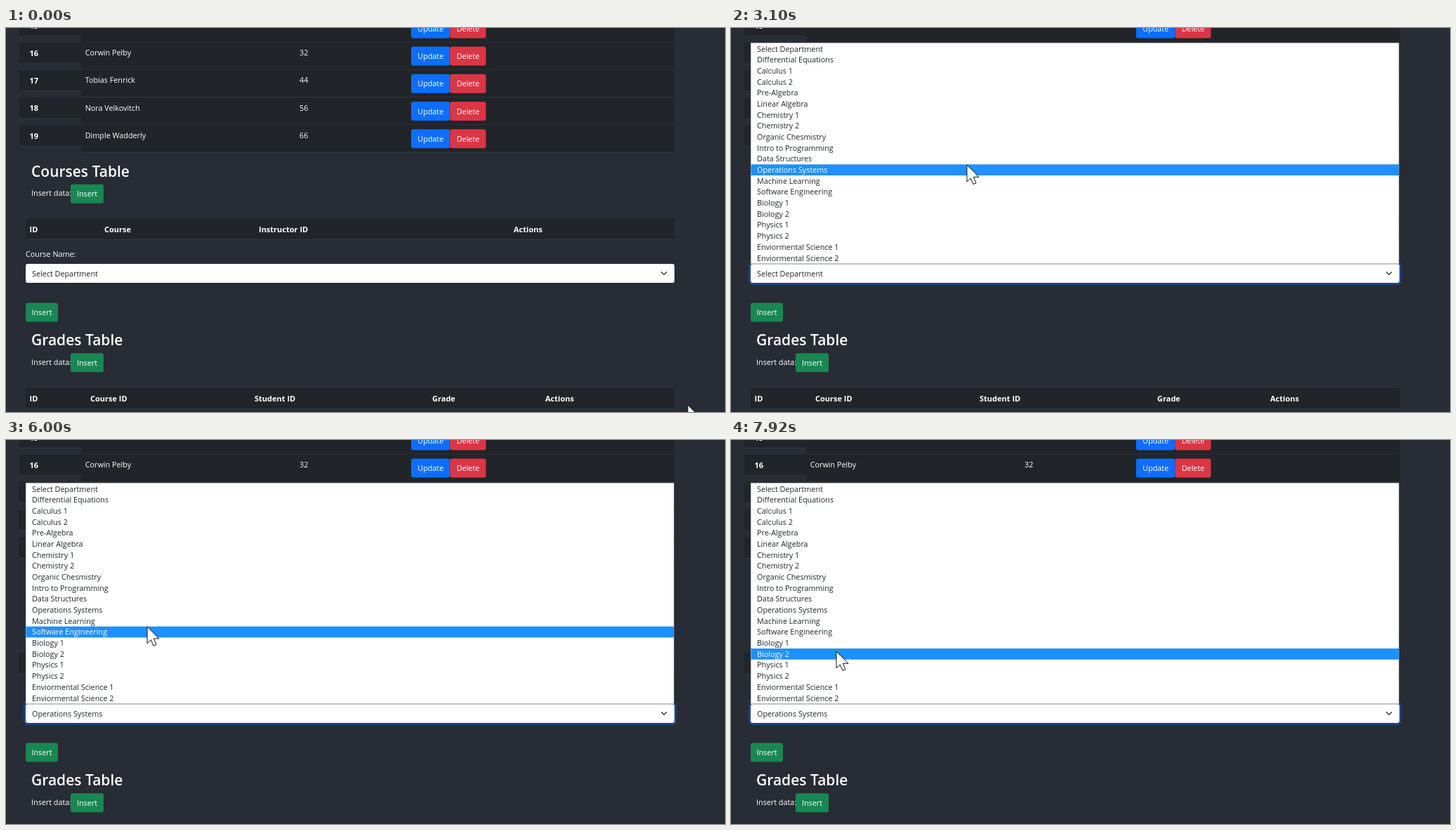
These frames come from a looping animation (1024 by 547 pixels, 8000 ms). An HTML page:

```html
<!DOCTYPE html>
<html lang="en">
<head>
<meta charset="utf-8">
<title>Courses table</title>
<style>
  html, body { margin: 0; width: 100%; height: 100%; overflow: hidden; background: #282c34; }
  svg { display: block; width: 1024px; height: 547px; font: 10.8px "Open Sans", sans-serif; fill: #fff; }
  .b { font-weight: 700; font-size: 11px; }
  .h { font-weight: 600; font-size: 21px; }
  .dark { fill: #212529; }
</style>
</head>
<body>
<svg id="stage" viewBox="0 0 1024 547"></svg>
<script>
const LOOP = 8000, ROW = 15.68, SHIFT = 40;
const CELL = '#212529', LINE = '#373b3e', GREEN = '#198754';
const options = ['Select Department', 'Differential Equations', 'Calculus 1', 'Calculus 2',
  'Pre-Algebra', 'Linear Algebra', 'Chemistry 1', 'Chemistry 2', 'Organic Chesmistry',
  'Intro to Programming', 'Data Structures', 'Operations Systems', 'Machine Learning',
  'Software Engineering', 'Biology 1', 'Biology 2', 'Physics 1', 'Physics 2',
  'Enviormental Science 1', 'Enviormental Science 2'];

// Bursts of movement: start, end, number of steps
const bursts = [[0, 0, 1], [70, 660, 10], [1070, 1320, 5], [1520, 2280, 12], [2350, 2900, 9],
  [3100, 3240, 3], [3440, 4200, 12], [4270, 5030, 12], [5090, 5860, 12], [5930, 6680, 12],
  [6750, 7510, 12], [7580, 7580, 1], [7780, 7920, 3]];

// Pointer path: time, x, y
const path = [[0, 971, 537], [300, 750, 428], [520, 630, 367], [660, 597, 351], [1450, 597, 351],
  [1620, 580, 300], [1865, 530, 178], [2280, 450, 172], [2600, 385, 182], [2900, 343, 190],
  [3100, 336, 195], [3240, 336, 200], [3500, 336, 200], [3800, 240, 270], [4200, 100, 367],
  [4450, 60, 399], [4690, 60, 399], [4830, 69, 390], [5030, 85, 387], [5280, 214, 386],
  [5560, 215, 384], [5860, 207, 317], [6000, 201, 265], [6250, 192, 205], [6544, 185, 154],
  [6680, 184, 144], [6820, 183, 136], [6960, 180, 146], [7300, 162, 270], [7510, 154, 317],
  [7580, 154, 318], [7710, 154, 318], [7920, 150, 301]];

const rect = (x, y, w, h, fill, r = 0, more = '') =>
  `<rect x="${x}" y="${y}" width="${w}" height="${h}" fill="${fill}" rx="${r}" ${more}/>`;
const text = (x, y, s, cls = '', more = '') => `<text x="${x}" y="${y}" class="${cls}" ${more}>${s}</text>`;
const button = (x, y, w, s, fill, more = '') =>
  rect(x, y, w, 27, fill, 3, more) + text(x + w / 2, y + 17.5, s, '', 'text-anchor="middle"');
const group = (id, body) => `<g id="${id}">${body}</g>`;

function row(y, x, id, name, num, numX, btnX) {
  return rect(19, y + .6, x - 19, 30, CELL) + rect(19, y + 30, x - 19, 1, LINE) +
    rect(x, y, 952 - x, 39, CELL) + rect(x, y + 38.6, 952 - x, 1, LINE) +
    text(33.5, y + 19.5, id, 'b') + text(x + 5.7, y + 18.8, name) + text(numX, y + 18.8, num) +
    button(btnX, y + 6.2, 55.5, 'Update', '#0d6efd') + button(btnX + 55.5, y + 6.2, 51, 'Delete', '#dc3545');
}
function header(y, cols, line = LINE, thick = 1) {
  return rect(28, y, 924, 29.5, CELL) + rect(28, y + 28.8, 924, thick, line) +
    cols.map(([x, s]) => text(x, y + 19, s, 'b')).join('');
}
const section = (y, title) => text(36, y, title, 'h') + text(36, y + 27.5, 'Insert data:') +
  button(92, y + 11.2, 47, 'Insert', GREEN);

const students = [['15', '', ''], ['16', 'Corwin Pelby', '32'], ['17', 'Tobias Fenrick', '44'],
  ['18', 'Nora Velkovitch', '56'], ['19', 'Dimple Wadderly', '66']];

stage.innerHTML =
  students.map(([id, name, n], i) => row(-18.8 + 39.2 * i, 107, id, name, n, 418, 577)).join('') +
  section(211.5, 'Courses Table') +
  group('empty', header(272, [[33.5, 'ID'], [140, 'Course'], [360, 'Instructor ID'], [723, 'Actions']])) +
  group('filled', row(302.2, 96, '45', 'Operations Systems', '50', 409, 630) +
    header(272, [[33.5, 'ID'], [101, 'Course'], [409, 'Instructor ID'], [630, 'Actions']], '#fff', 1.5)) +
  group('lower',
    text(28, 326, 'Course Name:') +
    rect(26.5, 334.5, 927, 30, 'none', 4, 'id="ring" stroke="#1d4486" stroke-width="3"') +
    rect(28, 336, 924, 27, '#fff', 3) +
    text(37, 354, '', 'dark', 'id="value"') +
    '<path d="M933.5 347.7l3.6 3.6 3.6-3.6" fill="none" stroke="#343a40" stroke-width="1.5" stroke-linecap="round"/>' +
    rect(25, 389, 52, 32, '#226046', 6, 'id="glow"') +
    button(28, 391.5, 46, 'Insert', GREEN, 'id="submit"') +
    section(452, 'Grades Table') +
    header(513, [[33.5, 'ID'], [120, 'Course ID'], [354, 'Student ID'], [607, 'Grade'], [768, 'Actions']]) +
    group('list', rect(28, 21, 923.5, 315, '#fff', 0, 'stroke="#555" stroke-width=".7"') +
      rect(28.4, 0, 922.8, ROW, '#1e90ff', 0, 'id="bar"') +
      options.map((s, i) => text(37, 33.6 + ROW * i, s, 'dark')).join(''))) +
  '<path id="pointer" d="M0 0V24L5.3 19 9 27.5 13 25.8 9.4 17.3H17Z" stroke="#111" stroke-width="1"/>';

const el = id => document.getElementById(id);
const items = [...el('list').querySelectorAll('text')];
const show = (id, on) => el(id).style.display = on ? '' : 'none';
const move = (id, x, y) => el(id).setAttribute('transform', `translate(${x} ${y})`);
const ramp = (t, start) => Math.max(0, Math.min(1, (t - start) / 150));

// Hold the picture between the steps of a burst
function snap(t) {
  const [start, end, n] = bursts.findLast(b => b[0] <= t);
  if (n < 2) return start;
  const step = (end - start) / (n - 1);
  return start + step * Math.min(n - 1, Math.floor((t - start) / step + .15));
}
function pointerAt(t) {
  const i = path.findIndex(p => p[0] > t);
  if (i < 0) return path.at(-1).slice(1);
  const [a, b] = [path[i - 1], path[i]], k = (t - a[0]) / (b[0] - a[0]);
  return [a[1] + (b[1] - a[1]) * k, a[2] + (b[2] - a[2]) * k];
}

function draw(now) {
  const t = snap(now % LOOP), [x, y] = pointerAt(t);
  const added = t >= 4680, chosen = t >= 3440, clicked = t >= 4540 && t < 5290;
  const dy = added ? SHIFT : 0;
  const open = t >= 1130 && t < 3440 || t >= 5360;

  show('empty', !added);
  show('filled', added);
  move('lower', 0, dy);
  el('value').textContent = options[chosen ? 11 : 0];
  el('ring').setAttribute('opacity', clicked ? 1 - ramp(t, 4540) : ramp(t, t < 4540 ? 1000 : 5220));
  show('glow', clicked);
  el('submit').setAttribute('fill', clicked ? '#157347' : GREEN);

  show('list', open);
  const hover = Math.floor((y + 2 - dy - 21.8) / ROW);
  const active = hover < options.length ? hover : chosen ? 11 : 0;
  el('bar').setAttribute('y', 21.8 + ROW * active);
  items.forEach((item, i) => item.style.fill = i === active ? '#fff' : '');

  move('pointer', x, y);
}

function frame() {
  draw(performance.now());
  requestAnimationFrame(frame);
}
frame();
</script>
</body>
</html>
```
